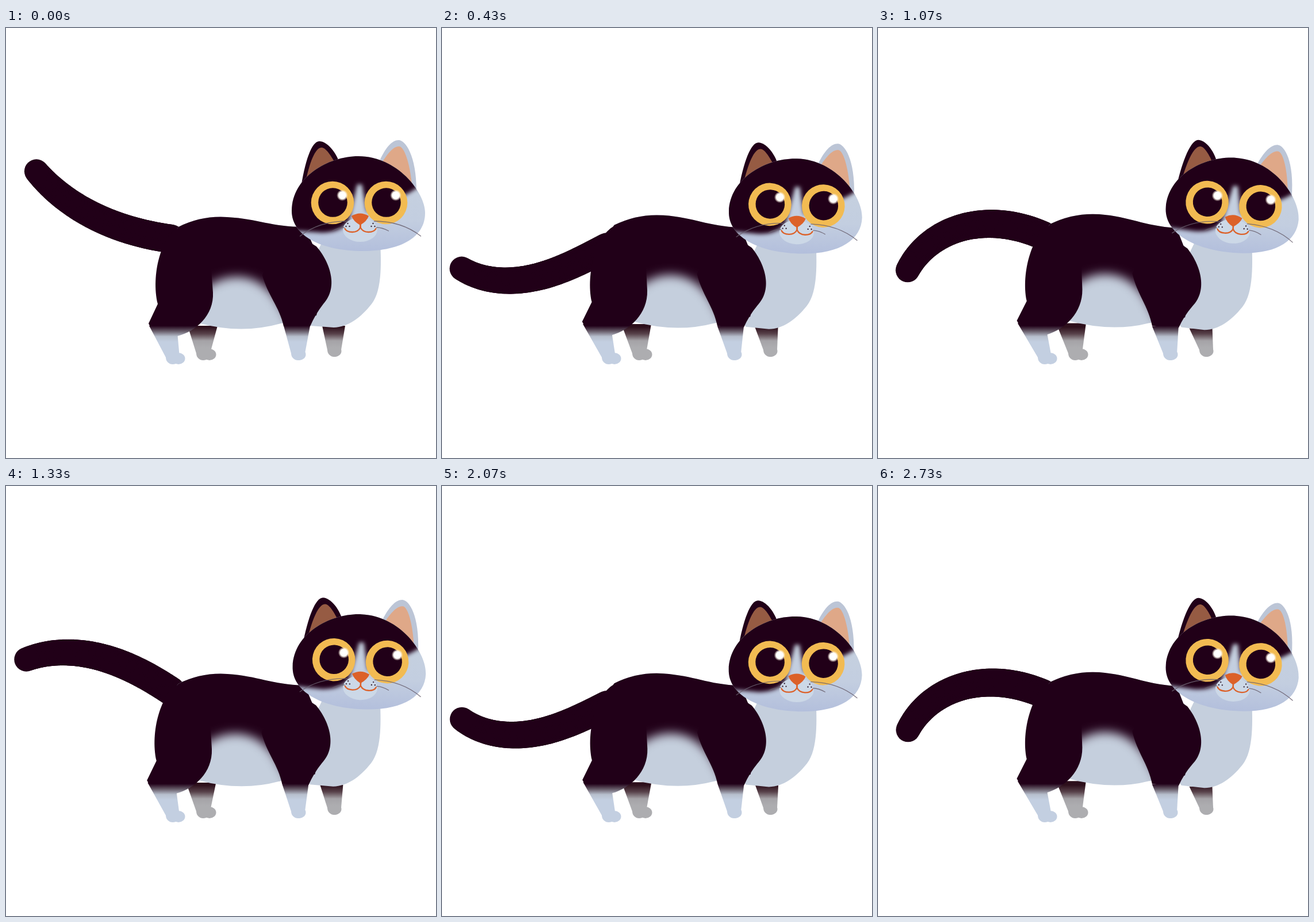
An HTML page with a canvas for the animation above (2760 ms loop, 748 by 748 pixels).

```html
<!DOCTYPE html>
<html lang="en">
<head>
<meta charset="utf-8">
<title>Cat wagging its tail</title>
<style>
html, body { margin: 0; width: 100%; height: 100%; overflow: hidden; background: #fff; }
canvas { display: block; width: 100vmin; height: 100vmin; }
</style>
</head>
<body>
<canvas id="stage" width="748" height="748"></canvas>
<script>
const ctx = document.getElementById('stage').getContext('2d');
const LOOP = 2760, SWING = 1667, RAD = Math.PI / 180;
const DARK = '#210018', LIGHT = '#c5cfdd', ORANGE = '#dc6129';

let lean = 0; // 0 = body forward, 1 = body leaning back
const clamp = v => Math.max(0, Math.min(1, v));

// Feet stay on the ground while the torso sways over them.
function sway(x, y, shear) {
  const free = lean * (1 - clamp((y - 515) / 50));
  return [
    x - shear * clamp((y - 330) / 185) * free,
    y + (12 * clamp((x - 420) / 140) - 6) * free
  ];
}

// Path data whose "x,y" pairs follow the sway.
const swayed = (d, shear) =>
  new Path2D(d.replace(/(\d+),(\d+)/g, (_, x, y) => sway(+x, +y, shear).join()));

function fill(path, color, blur = 0) {
  ctx.filter = blur ? `blur(${blur}px)` : 'none';
  ctx.fillStyle = color;
  ctx.fill(typeof path === 'string' ? new Path2D(path) : path);
  ctx.filter = 'none';
}

function fade(y0, y1, ...colors) {
  const g = ctx.createLinearGradient(0, y0, 0, y1);
  colors.forEach((c, i) => g.addColorStop(i / (colors.length - 1), c));
  return g;
}

function disc(x, y, rx, color, ry = rx) {
  ctx.fillStyle = color;
  ctx.beginPath();
  ctx.ellipse(x, y, rx, ry, 0, 0, 7);
  ctx.fill();
}

function line(d, color, width) {
  ctx.strokeStyle = color;
  ctx.lineWidth = width;
  ctx.lineCap = ctx.lineJoin = 'round';
  ctx.stroke(new Path2D(d));
}

// Tapered shin from a swaying knee to a fixed foot, with the paw in front.
function shin(knee, width, foot, ground, toe, color, shear = 8) {
  const [x, y] = sway(knee, 518, shear), ankle = ground - 12;
  fill(`M${x - width},${y}H${x + width}L${foot + 12},${ankle}H${foot - 12}Z`, color);
  disc(foot, ankle, 12, color);
  disc(foot + toe, ground - 10, 11.5, color, 10);
}

function drawTail(phase) {
  const cos = Math.cos(phase), sin = Math.sin(phase);
  const steps = 90, step = 268 / steps;
  let x = 287, y = 369 - 3 * cos + 12 * sin;
  for (let i = 0; i <= steps; i++) {
    const s = i / steps;
    disc(x, y, 25 - 4 * s * s, DARK);
    const rest = 3 - 16 * s + 11 * s * s;
    const curl = 7 + 43 * s;
    const whip = 50 * s * s + 20 * s - 30;
    const angle = (rest + curl * cos + whip * sin) * RAD;
    x -= step * Math.cos(angle);
    y -= step * Math.sin(angle);
  }
}

function drawBody() {
  const farLeg = fade(520, 556, '#2d0f1b', '#58424a', '#a5a3a7', '#adadb0');
  shin(342, 26, 343, 578, 11, farLeg);
  shin(570, 20, 571, 572, 1, farLeg, 11);

  fill(swayed('M560,350L651,370C652,400 656,455 636,480S595,520 570,521L530,518L500,480Z', 3), LIGHT);

  ctx.save();
  ctx.clip(swayed('M300,346Q340,326 385,329C440,332 460,346 520,346L535,380L552,440L540,500' +
    'L478,514Q410,533 338,514L270,470L290,360Z', 8));
  ctx.fillStyle = LIGHT;
  ctx.fillRect(0, 0, 748, 748);
  fill(swayed('M200,300L600,300L600,520L500,520L470,470Q440,432 400,433T330,470L200,470Z', 8), DARK, 9);
  ctx.restore();

  const leg = fade(518, 546, DARK, '#675c69', '#b7bfcd', '#c3cfe1');
  shin(273, 24, 290, 585, 10, leg);
  fill(swayed('M302,347C270,360 252,430 264,480L248,514L253,524L298,536C330,528 362,500 360,460' +
    'L357,420Q380,370 350,345Z', 8), leg);
  shin(506, 23, 508, 578, 2, leg);
  fill(swayed('M500,355L540,380C562,405 580,450 552,480Q538,498 529,519L483,519' +
    'C476,485 455,465 446,430L470,370Z', 8), leg);
}

function drawEye(x, y) {
  disc(x, y, 37.3, '#f2bb52');
  disc(x + 0.5, y - 0.5, 25.3, DARK);
  const glow = ctx.createRadialGradient(x + 17, y - 13, 3, x + 17, y - 13, 10);
  glow.addColorStop(0, '#fff');
  glow.addColorStop(0.45, '#fffdf8');
  glow.addColorStop(1, 'rgba(255,240,215,0)');
  disc(x + 17, y - 13, 10, glow);
}

function drawMuzzle() {
  disc(616, 351, 30, '#ccd8e7', 21);
  fill('M601,327Q616,318 631,327Q628,336 616,343Q604,336 601,327Z', ORANGE);
  for (const side of [-1, 1]) {
    ctx.save();
    ctx.translate(616.5, 0);
    ctx.scale(side, 1);
    line('M0,341V347Q4,355 14,355Q24,355 27,349', ORANGE, 2.3);
    for (let i = 0; i < 3; i++) disc(19 + 3 * i, 345 - 5 * (i % 2), 1.2, '#3a2638');
    line('M24,336Q72,336 105,362M28,347Q38,347 49,353', 'rgba(105,96,110,.85)', 1.3);
    ctx.restore();
  }
}

function drawHead(phase) {
  const cos = Math.cos(phase), sin = Math.sin(phase);
  ctx.save();
  ctx.translate(613 + 1.5 * (1 - cos), 330 + 2.4 * (1 - cos) + 1.7 * sin);
  ctx.rotate((2.35 * (1 - cos) - 0.8 * sin) * RAD);
  ctx.translate(-613, -330);

  fill('M512,285C520,230 532,197 545,197S575,215 582,240L560,270Z', DARK);
  fill('M521,268C530,225 540,208 549,208S570,230 576,242Z', '#965b43');
  fill('M648,235C660,207 672,195 683,195S714,220 714,285Z', '#bcc5d6');
  fill('M654,234C668,212 676,206 684,206S702,232 706,272Z', '#dfa888');

  ctx.save();
  ctx.clip(new Path2D('M613,223C560,223 497,260 497,318C497,362 550,388 620,388' +
    'C690,388 729,362 729,322C729,285 680,223 613,223Z'));
  ctx.fillStyle = fade(280, 388, '#c5d0df', '#c3cee0', '#b3bfdc');
  ctx.fillRect(480, 200, 270, 200);
  fill('M480,200H740L722,272Q700,292 660,302L628,320L619,272H611L596,335Q585,355 550,356L505,353L480,340Z', DARK, 3.5);
  ctx.restore();

  drawEye(568, 304);
  drawEye(661, 304);
  drawMuzzle();
  ctx.restore();
}

function draw() {
  const phase = performance.now() % LOOP / SWING * 2 * Math.PI;
  lean = (1 - Math.cos(phase)) / 2;
  ctx.fillStyle = '#fff';
  ctx.fillRect(0, 0, 748, 748);
  drawTail(phase + 0.06);
  drawBody();
  drawHead(phase);
  requestAnimationFrame(draw);
}
draw();
</script>
</body>
</html>
```
